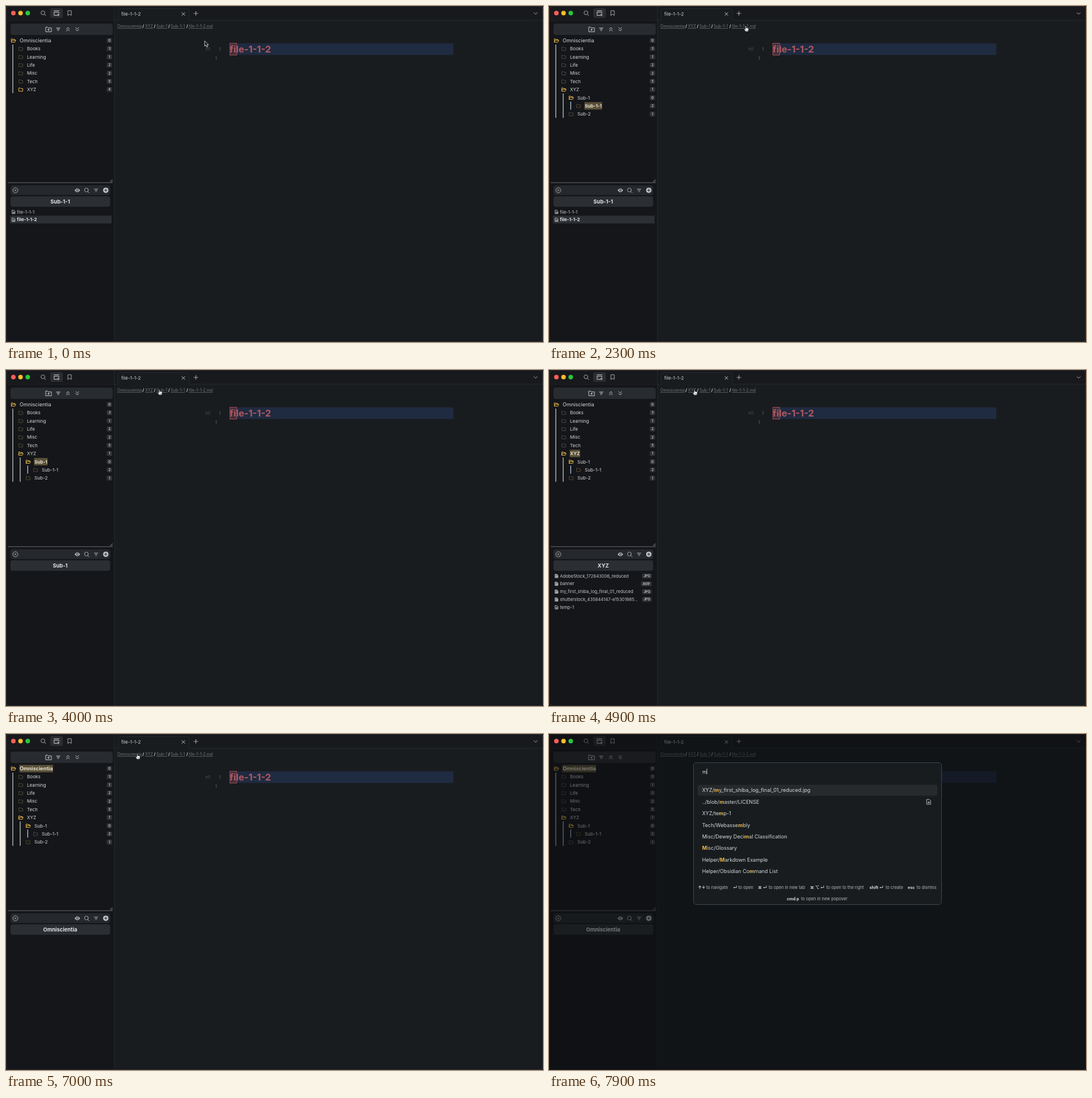
An HTML page for the animation above (8 s loop, 946 px wide and 592 px high).

```html
<!DOCTYPE html>
<html lang="en">
<head>
<meta charset="utf-8">
<style>
  html, body { margin: 0; width: 100%; height: 100%; overflow: hidden; background: #191c1f; }
  svg { display: block; width: 946px; height: 592px; }
  text { font-family: Inter, "DejaVu Sans", sans-serif; white-space: pre; }
  .icon { fill: none; stroke-width: 1; stroke-linecap: round; stroke-linejoin: round; }
</style>
</head>
<body>
<svg viewBox="0 0 946 592"><g id="app"></g><g id="modal"></g><g id="lights"></g><g id="pointer"></g></svg>
<script>
const LOOP = 8000, STEP = 100;
const YELLOW = '#e9b949', GREY = '#a9abad';
const byId = id => document.getElementById(id);

const rect = (x, y, w, h, fill, r = 0, extra = '') =>
  `<rect x="${x}" y="${y}" width="${w}" height="${h}" rx="${r}" fill="${fill}" ${extra}/>`;
const text = (x, y, s, size, fill, extra = '') =>
  `<text x="${x}" y="${y}" font-size="${size}" fill="${fill}" ${extra}>${s}</text>`;
const icon = (x, y, d, stroke = GREY, extra = '') =>
  `<path class="icon" transform="translate(${x} ${y})" d="${d}" stroke="${stroke}" ${extra}/>`;
const circle = (x, y, r, fill, extra = '') => `<circle cx="${x}" cy="${y}" r="${r}" fill="${fill}" ${extra}/>`;
const BOLD = 'font-weight="700"', MIDDLE = 'text-anchor="middle"';

// Icon outlines, centred on the origin
const SEARCH = 'M3 -0.5a3.4 3.4 0 1 1 -6.8 0a3.4 3.4 0 1 1 6.8 0M2 2L4.5 4.5';
const FILTER = 'M-3.2 -2.2H3.2M-2 0H2M-.8 2.2H.8';
const PLUS = 'M-3.5 0H3.5M0 -3.5V3.5';
const CROSS = 'M-2.6 -2.6L2.6 2.6M2.6 -2.6L-2.6 2.6';
const UP = 'M-2.6 -.4L0 -3L2.6 -.4M-2.6 3L0 .4L2.6 3';
const DOWN = 'M-2.6 -3L0 -.4L2.6 -3M-2.6 .4L0 3L2.6 .4';
const FOLDER = 'M-3.4 2.8V-2.6H-.9L0 -1.6H3.4V2.8Z';
const OPEN_FOLDER = 'M-3.6 2.8V-2.6H-1L0 -1.6H2.7V-.3M-3.6 2.8L-2.2 -.3H4.2L2.9 2.8Z';
const PAGE = 'M-2.3 -3H.6L2.4 -1.2V3H-2.3ZM-1 .2H1.1M-1 1.6H1.1';

const pill = (right, y, label, w) =>
  rect(right - w, y - 4.3, w, 8.6, '#303336', 2) +
  text(right - w / 2, y + 2.1, label, 5.9, '#c4c6c8', `${MIDDLE} font-weight="600"`);

function chrome() {
  let s = rect(0, 0, 946, 592, '#191c1f') + rect(0, 0, 191, 592, '#15161a') +
    rect(0, 0, 946, 25, '#18191d') +
    `<path d="M191 25H197V9q0 -4.5 4.5 -4.5H318.5q4.5 0 4.5 4.5V25H946" fill="#191c1f" stroke="#2b2d31" stroke-width=".8"/>` +
    rect(190.6, 0, .9, 592, '#2b2d31') + rect(0, 24.8, 191, .7, '#25272a');
  s += icon(65.5, 12.5, SEARCH) + rect(78, 4, 22, 17, '#2b2d31', 3) +
    icon(89, 12.5, 'M-4.2 -4H4.2M-4.2 -1.5H4.2V.5M-4.2 -1.5V4H1M3.2 1.5V5M1.4 3.2H5', '#c9cbcd') +
    icon(112, 12.5, 'M-3 4.2V-4.2H3V4.2L0 2Z');
  s += text(203, 16.9, 'file-1-1-2', 8.2, '#d0d2d4') + icon(312.5, 14, CROSS, '#c5c7c9') +
    icon(334.5, 13, PLUS) + icon(933, 13, 'M-3 -1.3L0 1.5L3 -1.3');

  s += rect(8, 31, 180, 20, '#282b2f', 4) +
    icon(75, 41, 'M-5 4V-3.8H-1.5L-.3 -2.4H5V4ZM-1.6 .8H1.6M0 -.8V2.4', '#c9cbcd') +
    icon(92, 41, FILTER, '#c9cbcd') + icon(109, 41, UP, '#c9cbcd') + icon(125.5, 41, DOWN, '#c9cbcd');
  s += rect(3, 310.7, 185, 1.3, '#55585b') + icon(185.5, 307.8, 'M-2 2L2 -2M.5 2L2 .5', '#888', 'stroke-width=".7"');
  s += rect(8, 316, 175.5, 17, '#25282c', 4) + rect(8, 335.3, 175.5, 18.4, '#2b2e32', 4) +
    circle(16.5, 324.7, 4.5, 'none', `stroke="${GREY}"`) + icon(16.5, 324.7, 'M-1.5 -1.5L1.5 1.5M1.5 -1.5L-1.5 1.5') +
    `<path d="M120.8 324.7Q125.7 317.7 130.6 324.7Q125.7 331.7 120.8 324.7Z" fill="#b9bbbd"/>` +
    circle(125.7, 324.7, 2.1, '#25282c') + circle(125.7, 324.7, 1.1, '#b9bbbd') +
    icon(142, 324.7, SEARCH) + icon(158.7, 324.7, FILTER) +
    circle(175.8, 324.7, 4.8, '#c0c2c4') + icon(175.8, 324.7, 'M-2.4 0H2.4M0 -2.4V2.4', '#25282c');

  const crumbs = [[196, 'Omniscientia'], [245, 'XYZ'], [265, 'Sub-1'], [290, 'Sub-1-1'], [322, 'file-1-1-2.md']];
  for (const [x, name] of crumbs) s += text(x, 38, name, 7.05, '#74777a', 'text-decoration="underline"');
  for (const x of [240.3, 260.6, 285.8, 317.7]) s += text(x, 38.1, '/', 7.4, '#d0d2d4', BOLD);

  s += rect(394, 65.8, 394, 20.4, '#1f2b41') + rect(394.4, 65.8, 11.8, 20.6, '#3c2d3d', 0, 'stroke="#b95760" stroke-width=".9"') +
    text(394, 82, 'file-1-1-2', 16.5, '#b05860', BOLD) +
    text(351.5, 78.6, 'H1', 7.3, '#4d5156') + text(375.2, 78.6, '1', 7.3, '#656a70') + text(368.6, 95.3, '1', 7.3, '#656a70');
  return s + rect(.4, .4, 945.2, 591.2, 'none', 6, 'stroke="#3b3d40" stroke-width=".8"');
}

function tree(selected, expanded) {
  const rows = [[0, 'Omniscientia', 0, 1], [1, 'Books', 3], [1, 'Learning', 1], [1, 'Life', 2],
    [1, 'Misc', 2], [1, 'Tech', 5], [1, 'XYZ', expanded ? 1 : 4, expanded]];
  if (expanded) rows.push([2, 'Sub-1', 0, 1], [3, 'Sub-1-1', 2], [2, 'Sub-2', 1]);
  let s = rect(11.3, 68, 1.4, expanded ? 129 : 85.5, '#b9bbbd');
  if (expanded) s += rect(24.3, 154, 1.4, 43, '#b9bbbd') + rect(37.6, 168.5, 1.4, 14, '#a9c0dc');
  rows.forEach(([depth, name, count, open], i) => {
    const y = 60.8 + i * 14.4, x = 24 + depth * 13;
    const bright = open || name === 'XYZ', mark = name === selected;
    s += icon(x - 11, y - .2, open ? OPEN_FOLDER : FOLDER, bright ? YELLOW : '#514936', 'stroke-width=".9"');
    s += text(x, y + (depth ? 2.9 : 3.2), name, depth ? 8.1 : 9.1, mark ? '#e5dfce' : '#d5d7d9', mark ? `class="mark" ${BOLD}` : '');
    s += pill(187, y, count, 9.5);
  });
  return s;
}

function fileList(folder) {
  let s = text(95.5, 348, folder, 9.3, '#e2e4e6', `${MIDDLE} ${BOLD}`);
  const files = {
    'Sub-1-1': [['file-1-1-1'], ['file-1-1-2']],
    XYZ: [['AdobeStock_172643006_reduced', 'JPG'], ['banner', 'AVIF'], ['my_first_shiba_log_final_01_reduced', 'JPG'],
      ['shutterstock_435844147-e15301985...', 'JPG'], ['temp-1']]
  }[folder] || [];
  files.forEach(([name, type], i) => {
    const y = 362.9 + i * 13.8, active = name === 'file-1-1-2';
    if (active) s += rect(7, y - 7.2, 179, 13.6, '#2c3034');
    s += icon(13.4, y, PAGE, '#b9bbbd', `stroke-width=".9" ${type ? 'style="fill:#777a7d"' : ''}`) +
      text(19.3, y + 2.7, name, active ? 8 : 7.65, active ? '#e2e4e6' : '#c5c7c9', active ? BOLD : '');
    if (type) s += pill(181, y, type, type.length > 3 ? 19 : 17);
  });
  return s;
}

function modal(typed) {
  const bold = s => s.replace(/\*(.)/g, typed ? `<tspan fill="${YELLOW}" font-weight="700">$1</tspan>` : '$1');
  let s = rect(0, 0, 946, 592, '#0b0c0e', 0, 'opacity=".5"') +
    rect(254.5, 50.5, 437, 250, '#181c1f', 5, 'stroke="#3c474e"') + rect(262, 89.5, 422, 19.2, '#272a2d', 3);
  s += text(270, 69.6, typed ? 'm' : '', 9.1, '#dadcde') + rect(typed ? 277.7 : 270, 61, .8, 10, '#e2e4e6');
  ['XYZ/*my_first_shiba_log_final_01_reduced.jpg', '../blob/*master/LICENSE', 'XYZ/te*mp-1', 'Tech/Webasse*mbly',
    'Misc/Dewey Deci*mal Classification', '*Misc/Glossary', 'Helper/*Markdown Example', 'Helper/Obsidian Co*mmand List']
    .forEach((row, i) => s += text(269.7, 102.4 + i * 20.4, bold(row), 9.05, '#d5d7d9'));
  s += icon(669, 119.5, 'M-3.3 -4.2H1L3.4 -1.8V4.2H-3.3ZM-1.7 1H1.7M0 -.7V2.7', '#b9bbbd');
  const hints = [[262.5, '↑↓', 277, 'to navigate'], [324, '↵', 333.5, 'to open'], [368, '⌘ ↵', 387, 'to open in new tab'],
    [460, '⌘ ⌥ ↵', 488.5, 'to open to the right'], [564.5, 'shift ↵', 593, 'to create'], [632, 'esc', 647.7, 'to dismiss'],
    [419, 'cmd p', 444, 'to open in new popover', 20.2]];
  for (const [x, key, x2, label, dy = 0] of hints)
    s += text(x, 272.8 + dy, key, 7.2, '#dadcde', BOLD) + text(x2, 272.8 + dy, label, 7.35, '#b4b6b8');
  return s;
}

const ARROW = '<path d="M0 0V9.4L2.2 7.4L3.8 11L5.5 10.2L3.9 6.8H6.8Z" fill="#111" stroke="#ddd" stroke-width=".9" stroke-linejoin="round"/>';
const HAND = '<path d="M-2.2 -4.6Q-1.3 -5.6 -.6 -4.6V-1.3Q.3 -2 1 -1.1Q1.9 -1.7 2.4 -.7Q3.6 -1.1 3.8 .2V2L2.8 5H-1.8L-4.2 1.4Q-4.4 .3 -3.3 .4L-2.2 1.4Z" fill="#f2f2f2" stroke="#111" stroke-width=".7"/><path d="M-.2 1.8V3.6M1.1 1.8V3.6M2.4 1.8V3.6" stroke="#555" stroke-width=".5"/>';

// Pointer stops: time, x, y
const path = [[100, 350, 61.5], [1300, 349, 44], [1500, 349, 43], [1700, 348, 40], [2700, 348, 40],
  [3100, 273, 39], [3900, 273, 39], [4400, 257.5, 39.2], [5800, 257.5, 39.2], [6200, 232.5, 39.5]];
// Clicks: time, selected folder, folder listed below
const clicks = [[0, '', 'Sub-1-1'], [1900, 'Sub-1-1', 'Sub-1-1'], [3200, 'Sub-1', 'Sub-1'],
  [4500, 'XYZ', 'XYZ'], [6200, 'Omniscientia', 'Omniscientia']];
const MODAL_AT = 7200, TYPED_AT = 7800;

function position(t) {
  const i = path.findIndex(p => p[0] > t);
  if (i === 0) return path[0].slice(1);
  if (i < 0) return path.at(-1).slice(1);
  const [a, b] = [path[i - 1], path[i]];
  const u = (t - a[0]) / (b[0] - a[0]), e = u * u * (3 - 2 * u);
  return [1, 2].map(k => a[k] + (b[k] - a[k]) * e);
}

const shown = {};
function update(id, key, make) {
  if (shown[id] === key) return;
  shown[id] = key;
  byId(id).innerHTML = make();
}

function markSelection() {
  const label = document.querySelector('.mark');
  if (!label) return;
  const x = +label.getAttribute('x'), y = +label.getAttribute('y');
  label.insertAdjacentHTML('beforebegin', rect(x - .5, y - 9.5, label.getComputedTextLength() + 1, 13, '#5a5139'));
}

function draw(now) {
  const t = Math.floor(now % LOOP / STEP) * STEP;
  const [since, selected, folder] = clicks.findLast(c => c[0] <= t);
  if (shown.app !== since) {
    update('app', since, () => chrome() + tree(selected, since > 0) + fileList(folder));
    markSelection();
  }
  const open = t >= MODAL_AT, typed = t >= TYPED_AT;
  update('modal', `${open}${typed}`, () => open ? modal(typed) : '');
  update('pointer', open ? 'none' : t < 1600 ? 'arrow' : 'hand', () => open ? '' : t < 1600 ? ARROW : HAND);
  byId('pointer').setAttribute('transform', `translate(${position(t)})`);
  requestAnimationFrame(draw);
}

byId('lights').innerHTML = circle(13, 12.6, 4, '#fe5f57') + circle(25.6, 12.6, 4, '#febc2e') + circle(38.3, 12.6, 4, '#28c840');
requestAnimationFrame(draw);
</script>
</body>
</html>
```
